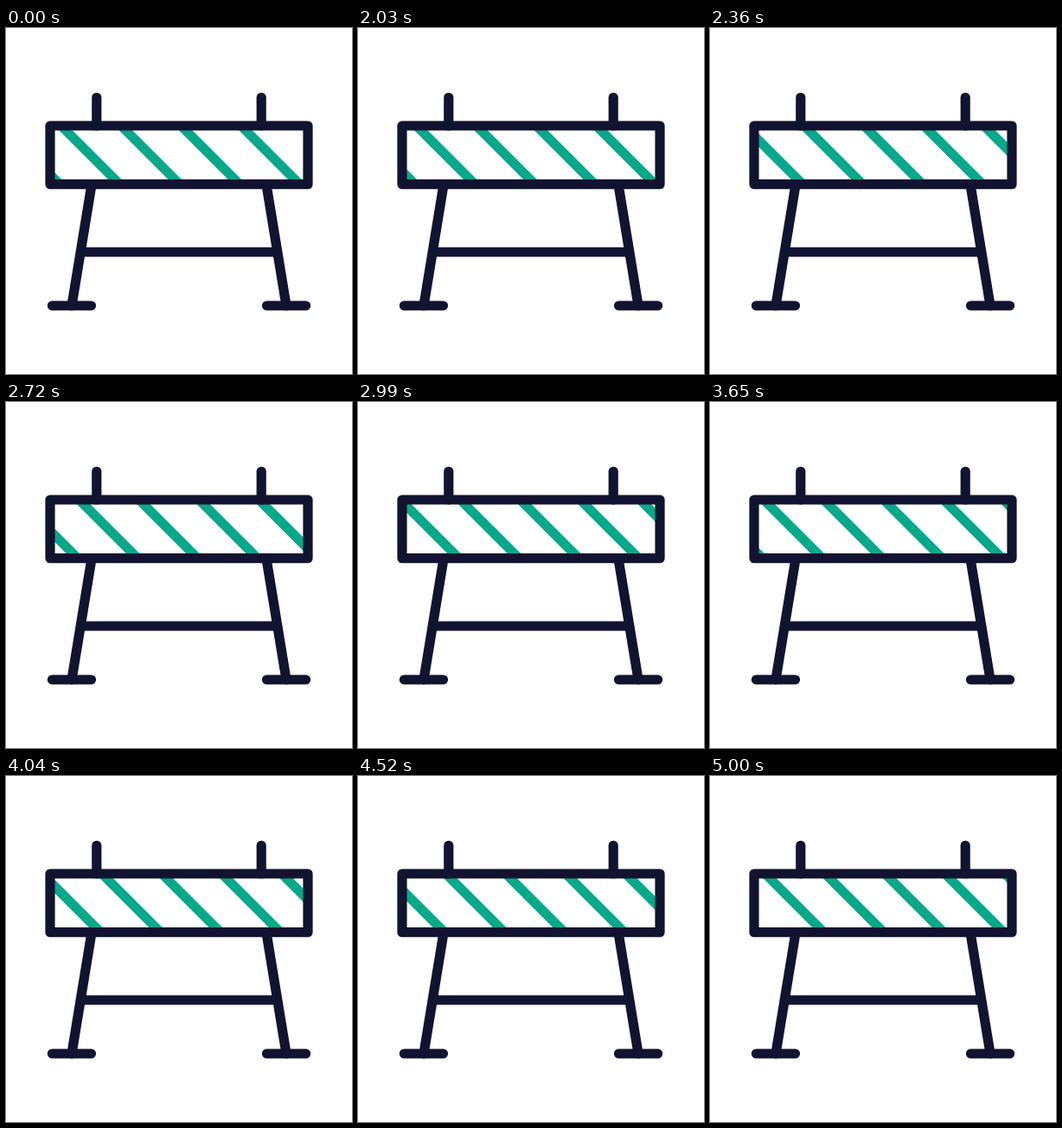
An HTML page with a canvas for the animation above (5.03 s loop, 400 px wide and 400 px high).

```html
<!DOCTYPE html>
<html lang="en">
<head>
<meta charset="utf-8">
<title>Road barrier</title>
<style>
  html, body { margin: 0; width: 100%; height: 100%; overflow: hidden; background: #fff; }
  canvas { display: block; width: 400px; height: 400px; }
</style>
</head>
<body>
<canvas id="stage" width="400" height="400"></canvas>
<script>
const ctx = document.getElementById('stage').getContext('2d');
const DARK = '#121331', GREEN = '#08a88a';
const LOOP = 5030, HOLD = 2000, STEP = 30, STEPS = 100;
const GAP = 69.3, STRIPES = 9, TRAVEL = GAP * 5;
const SPEED = 3.75;
// The stripes roll evenly, then brake to rest on the last step.
const BRAKE = 2 * TRAVEL / SPEED - STEPS;

function travel(n) {
  if (n <= BRAKE) return SPEED * n;
  const left = STEPS - n;
  return TRAVEL - SPEED * left * left / (2 * (STEPS - BRAKE));
}

function line(x1, y1, x2, y2) {
  ctx.beginPath();
  ctx.moveTo(x1, y1);
  ctx.lineTo(x2, y2);
  ctx.stroke();
}

function drawStripes(shift) {
  ctx.save();
  ctx.beginPath();
  ctx.rect(51, 113, 298, 67.5);
  ctx.clip();
  ctx.strokeStyle = GREEN;
  ctx.lineWidth = 11;
  for (let i = 0; i < STRIPES; i++) {
    const x = 68.8 + (3 - i) * GAP + shift;
    line(x - 20, 98, x + 77, 195);
  }
  ctx.restore();
}

function drawBarrier() {
  ctx.strokeStyle = DARK;
  ctx.lineWidth = 11.2;
  ctx.lineCap = ctx.lineJoin = 'round';
  ctx.strokeRect(51, 113, 298, 67.7);
  for (const side of [-1, 1]) {
    const x = d => 200 + side * d;
    line(x(95.2), 80.3, x(95.2), 113);
    line(x(101), 181, x(124), 321);
    line(x(101.5), 321, x(146.6), 321);
  }
  line(89, 259, 311, 259);
}

function draw(t) {
  const n = Math.max(0, Math.floor((t % LOOP - HOLD) / STEP));
  ctx.fillStyle = '#fff';
  ctx.fillRect(0, 0, 400, 400);
  drawStripes(travel(Math.min(n, STEPS)));
  drawBarrier();
}

const start = performance.now();
function tick() {
  draw(performance.now() - start);
  requestAnimationFrame(tick);
}
tick();
</script>
</body>
</html>
```
